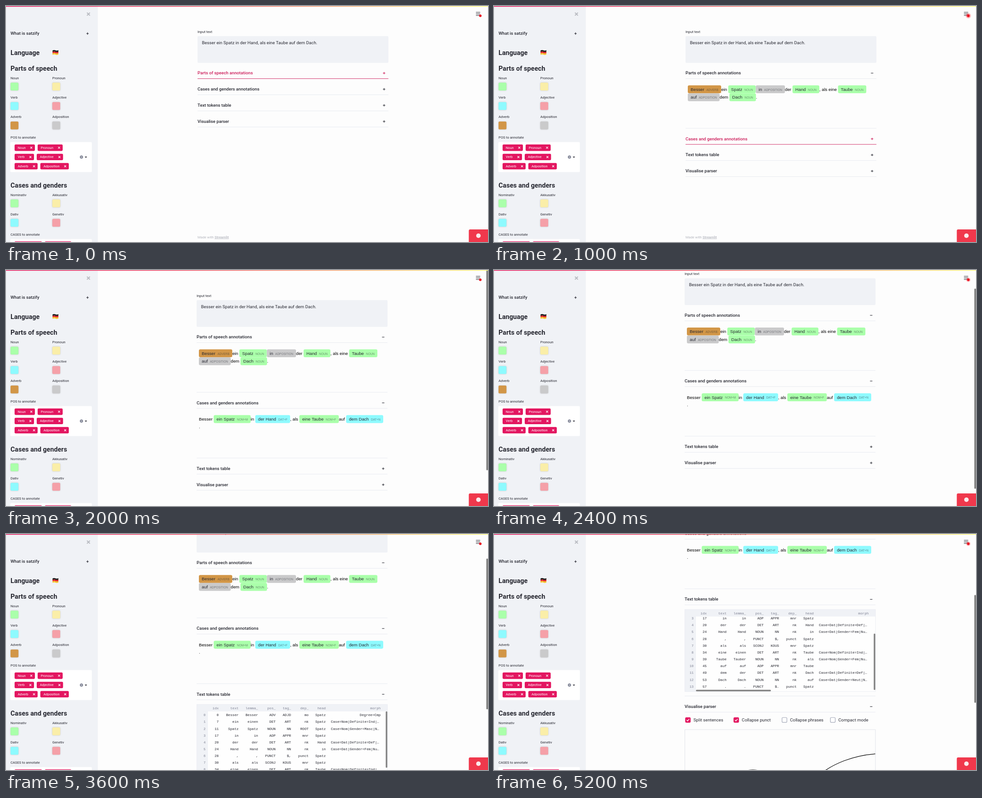
An HTML page with a canvas for the animation above (5400 ms loop, 1067 px wide and 525 px high).

```html
<!DOCTYPE html>
<html lang="en">
<head>
<meta charset="utf-8">
<title>satzify</title>
<style>
html, body { margin: 0; width: 100%; height: 100%; overflow: hidden; background: #fdfdfd; }
canvas { display: block; width: 1067px; height: 525px; }
</style>
</head>
<body>
<canvas id="stage"></canvas>
<script>
const W = 1067, H = 525, LOOP = 5400, STEP = 200;
const canvas = document.getElementById('stage');
const dpr = window.devicePixelRatio || 1;
canvas.width = Math.round(W * dpr);
canvas.height = Math.round(H * dpr);
const ctx = canvas.getContext('2d');

const SANS = 'Roboto, sans-serif';
const HELV = '"Liberation Sans", Arial, sans-serif';
const MONO = '"Liberation Mono", monospace';
const INK = '#262730', PINK = '#e31660', HOVER = '#cc1a58', PANEL = '#f0f2f6', RULE = '#e6e8f0', MUTED = '#808495';
const GREEN = '#aaffaa', YELLOW = '#faeea8', CYAN = '#8efafe', ROSE = '#f5a0a8', BROWN = '#d29647', GREY = '#cacacb';

const ramp = (t, a, b) => {
  const k = Math.min(1, Math.max(0, (t - a) / (b - a)));
  return k * k * (3 - 2 * k);
};

// Vertically centred text; returns its width.
function text(str, x, cy, size = 9.7, { weight = 400, color = INK, family = SANS, align = 'left' } = {}) {
  ctx.font = `${weight} ${size}px ${family}`;
  ctx.fillStyle = color;
  ctx.textAlign = align;
  ctx.fillText(str, x, cy + size * 0.35);
  return ctx.measureText(str).width;
}

function box(x, y, w, h, color, r = 0) {
  ctx.fillStyle = color;
  ctx.beginPath();
  ctx.roundRect(x, y, w, h, r);
  ctx.fill();
}

function disc(x, y, r, color) {
  ctx.fillStyle = color;
  ctx.beginPath();
  ctx.arc(x, y, r, 0, 7);
  ctx.fill();
}

function path(points, color, width = 1) {
  ctx.strokeStyle = color;
  ctx.lineWidth = width;
  ctx.beginPath();
  points.forEach(([x, y]) => ctx.lineTo(x, y));
  ctx.stroke();
}

function cross(x, y, r, color, width) {
  path([[x - r, y - r], [x + r, y + r]], color, width);
  path([[x - r, y + r], [x + r, y - r]], color, width);
}

function toggle(x, y, open, color = INK) {
  path([[x - 2.6, y], [x + 2.6, y]], color, 1.1);
  if (!open) path([[x, y - 2.6], [x, y + 2.6]], color, 1.1);
}

function clipped(x, y, w, h, draw) {
  ctx.save();
  ctx.beginPath();
  ctx.rect(x, y, w, h);
  ctx.clip();
  draw();
  ctx.restore();
}

function swatch(label, x, y, color) {
  text(label, x, y, 7.74);
  ctx.save();
  ctx.shadowColor = 'rgba(0,0,0,.22)';
  ctx.shadowBlur = 2.5 * dpr;
  box(x, y + 10.3, 17.5, 17.5, color, 2.5);
  ctx.restore();
}

function tag(label, x, y, w) {
  box(x, y, w, 14.4, PINK, 2.4);
  text(label, x + 7, y + 7.2, 7.4, { color: '#fff' });
  cross(x + w - 8, y + 7.2, 2.1, '#fff', 1.1);
}

function flag(x, y) {
  ['#1c1c1c', '#dd1b22', '#f7c52c'].forEach((color, i) => {
    ctx.fillStyle = color;
    ctx.beginPath();
    const edge = (px, row) => ctx.lineTo(x + px, y + row * 3.2 - Math.sin(px / 13 * 6.28) * 0.8 - px * 0.06);
    for (let px = 0; px <= 13; px++) edge(px, i);
    for (let px = 13; px >= 0; px--) edge(px, i + 1);
    ctx.fill();
  });
}

function sidebar() {
  box(0, 0, 203.3, H, PANEL);
  cross(182.5, 18, 3.3, '#b9bbc1', 2);
  text('What is satzify', 10, 61, 9.7, { weight: 500 });
  toggle(180.5, 61.3, false);
  const heading = (str, y) => text(str, 10, y, 14.6, { weight: 700 });
  heading('Language', 104);
  flag(103, 99);
  heading('Parts of speech', 139.3);
  swatch('Noun', 10, 160.2, GREEN);
  swatch('Pronoun', 102.5, 160.2, YELLOW);
  swatch('Verb', 10, 203.4, CYAN);
  swatch('Adjective', 102.5, 203.4, ROSE);
  swatch('Adverb', 10, 246.6, BROWN);
  swatch('Adposition', 102.5, 246.6, GREY);

  text('POS to annotate', 10, 292.7, 7.74);
  box(9.5, 302.8, 180.5, 66.7, '#fff', 2);
  tag('Noun', 19, 308, 45);
  tag('Pronoun', 70, 308, 55.5);
  tag('Verb', 19, 328.7, 43);
  tag('Adjective', 68, 328.7, 58.3);
  tag('Adverb', 19, 349.2, 51);
  tag('Adposition', 76, 349.2, 63);
  disc(167, 336, 3.5, MUTED);
  cross(167, 336, 1.1, '#fff', 0.8);
  ctx.fillStyle = INK;
  ctx.beginPath();
  ctx.moveTo(174.3, 335);
  ctx.lineTo(179.5, 335);
  ctx.lineTo(176.9, 337.7);
  ctx.fill();

  heading('Cases and genders', 399);
  swatch('Nominativ', 10, 420, GREEN);
  swatch('Akkusativ', 102.5, 420, YELLOW);
  swatch('Dativ', 10, 463.2, CYAN);
  swatch('Genetiv', 102.5, 463.2, ROSE);
  text('CASES to annotate', 10, 508.6, 7.74);
  box(9.5, 518.5, 180.5, 10, '#fff', 2);
  tag('Nominativ', 19, 523.7, 60.5);
  tag('Akkusativ', 86, 523.7, 58.5);
}

// A run is plain text, or [word, label, colour] for a highlighted chip.
function annotated(runs, x, cy) {
  for (const run of runs) {
    if (typeof run === 'string') {
      x += text(run, x, cy, 9.68, { family: HELV, color: '#000' });
      continue;
    }
    const [word, label, color] = run;
    ctx.font = `9.68px ${HELV}`;
    const wordWidth = ctx.measureText(word).width;
    ctx.font = `6.48px ${HELV}`;
    const width = wordWidth + ctx.measureText(label).width + 17.2;
    box(x, cy - 8.8, width, 17.6, color, 3.3);
    text(word, x + 6.3, cy, 9.68, { family: HELV });
    text(label, x + 11.1 + wordWidth, cy + 1, 6.48, { family: HELV, color: 'rgba(38,39,48,.5)' });
    x += width;
  }
}

const noun = word => [word, 'NOUN', GREEN];
const adposition = word => [word, 'ADPOSITION', GREY];

function speechBody(x, y) {
  annotated([['Besser', 'ADVERB', BROWN], 'ein ', noun('Spatz'), adposition('in'), 'der ', noun('Hand'),
    ', als eine ', noun('Taube')], x + 5, y + 36.3);
  annotated([adposition('auf'), 'dem ', noun('Dach'), '.'], x + 5, y + 54);
}

function casesBody(x, y) {
  annotated(['Besser ', ['ein Spatz', 'NOM+M', GREEN], 'in ', ['der Hand', 'DAT+F', CYAN], ', als ',
    ['eine Taube', 'NOM+F', GREEN], 'auf ', ['dem Dach', 'DAT+N', CYAN]], x + 5, y + 36.4);
  annotated(['.'], x + 5, y + 53);
}

const COLUMNS = [49, 93, 136, 175, 209, 248, 286, 407.5];
const HEADER = 'idx text lemma_ pos_ tag_ dep_ head morph'.split(' ');
const TOKENS = `0 Besser Besser ADV ADJD mo Spatz Degree=Cmp
7 ein einen DET ART nk Spatz Case=Nom|Definite=Ind|…
11 Spatz Spatz NOUN NN ROOT Spatz Case=Nom|Gender=Masc|N…
17 in in ADP APPR mnr Spatz
20 der der DET ART nk Hand Case=Dat|Definite=Def|…
24 Hand Hand NOUN NN nk in Case=Dat|Gender=Fem|Nu…
28 , , PUNCT $, punct Spatz
30 als als SCONJ KOUS mnr Spatz
34 eine einen DET ART nk Taube Case=Nom|Definite=Ind|…
39 Taube Tauber NOUN NN nk als Case=Nom|Gender=Fem|Nu…
45 auf auf ADP APPR mnr Taube
49 dem der DET ART nk Dach Case=Dat|Definite=Def|…
53 Dach Dach NOUN NN nk auf Case=Dat|Gender=Neut|N…
57 . . PUNCT $. punct Spatz`.split('\n').map(row => row.split(' '));

function tableBody(x, y, s) {
  const top = y + 22.8, height = 182.5;
  const cell = (str, right, cy, color = INK) => text(str, right, cy, 7.74, { family: MONO, align: 'right', color });
  box(x, top, 422.3, height, '#fefefe');
  box(x, top, 25, height, PANEL);
  clipped(x, top + 15.3, 423, height - 15.3, () => {
    TOKENS.forEach((row, i) => {
      const cy = top + 23.5 + i * 15.15 - s.tableScroll * 49.4;
      cell(i, x + 20, cy, MUTED);
      row.forEach((value, c) => cell(value, x + COLUMNS[c] - (value.length > 20 ? 3.5 : 0), cy));
    });
  });
  box(x, top, 422.3, 15.5, PANEL);
  HEADER.forEach((name, c) => cell(name, x + COLUMNS[c], top + 8.3, MUTED));
  ctx.strokeStyle = RULE;
  ctx.lineWidth = 0.7;
  ctx.strokeRect(x + 0.3, top, 422, height);
  box(x + 418.6, top + 15.5 + s.tableScroll * 38, 3.5, 125.5, '#858585', 1.7);
  box(x + 25, top + 178.5, 166, 3.5, '#858585', 1.7);
}

function checkbox(label, x, cy, checked) {
  ctx.beginPath();
  ctx.roundRect(x + 0.6, cy - 5.4, 10.8, 10.8, 2);
  ctx.lineWidth = 1.2;
  ctx.strokeStyle = checked ? PINK : '#a3a8b8';
  ctx.fillStyle = checked ? PINK : '#fff';
  ctx.fill();
  ctx.stroke();
  if (checked) path([[x + 3.2, cy], [x + 5.3, cy + 2.2], [x + 9, cy - 2.3]], '#fff', 1.4);
  text(label, x + 18.3, cy, 9.7);
}

function parserBody(x, y) {
  checkbox('Split sentences', x + 1.3, y + 30, true);
  checkbox('Collapse punct', x + 108.3, y + 30, true);
  checkbox('Collapse phrases', x + 215, y + 30, false);
  checkbox('Compact mode', x + 322, y + 30, false);
  ctx.strokeStyle = '#e2e4ea';
  ctx.lineWidth = 1;
  ctx.strokeRect(x + 0.5, y + 51.5, 421.8, 264);
  clipped(x, y + 51, 422, 264, () => {
    ctx.strokeStyle = '#000';
    ctx.lineWidth = 1.2;
    ctx.beginPath();
    ctx.moveTo(x + 295, y + 155);
    ctx.bezierCurveTo(x + 328, y + 126, x + 375, y + 109, x + 424, y + 105.3);
    ctx.moveTo(x + 95, y + 172);
    ctx.bezierCurveTo(x + 118, y + 131, x + 184, y + 131, x + 207, y + 172);
    ctx.stroke();
  });
}

const SECTIONS = [
  { title: 'Parts of speech annotations', body: speechBody, height: 110.4, hover: [0, 700], opens: 300 },
  { title: 'Cases and genders annotations', body: casesBody, height: 110.4, hover: [700, 1700], opens: 1100 },
  { title: 'Text tokens table', body: tableBody, height: 202.7, hover: [2500, 3300], opens: 3000 },
  { title: 'Visualise parser', body: parserBody, height: 327, hover: [4400, 5000], opens: 4600 },
];

function mainArea(t) {
  const opened = SECTIONS.map(s => ramp(t, s.opens, s.opens + 400));
  const pageHeight = 397.8 + SECTIONS.reduce((sum, s, i) => sum + s.height * opened[i], 0);
  const wanted = 65.5 * ramp(t, 2000, 2600) + 19.8 * ramp(t, 3300, 3600) + 211.1 * ramp(t, 3600, 4000);
  const scroll = Math.min(wanted, Math.max(0, pageHeight - H));
  const overflowing = pageHeight > H;
  const x = overflowing ? 422 : 424;
  const state = { tableScroll: ramp(t, 3800, 4200) };

  text('Input text', x, 57 - scroll, 7.74);
  box(x, 67 - scroll, 422.5, 59.5, PANEL, 2);
  text('Besser ein Spatz in der Hand, als eine Taube auf dem Dach.', x + 9.8, 81.6 - scroll, 9.73);

  let y = 149 - scroll;
  SECTIONS.forEach((section, i) => {
    const hovered = t >= section.hover[0] && t < section.hover[1];
    const color = hovered ? HOVER : INK;
    const bodyHeight = section.height * opened[i];
    text(section.title, x, y, 9.7, { weight: 500, color });
    toggle(x + 413, y + 0.3, opened[i] > 0, color);
    path([[x, y + 12.6], [x + 422.5, y + 12.6]], hovered ? HOVER : RULE, 0.9);
    if (bodyHeight > 0) {
      clipped(x - 1, y + 12.6, 426, bodyHeight, () => section.body(x, y, state));
      path([[x, y + 12.6 + bodyHeight], [x + 422.5, y + 12.6 + bodyHeight]], RULE, 0.9);
    }
    y += 35.85 + bodyHeight;
  });

  const footer = Math.max(H, pageHeight) - 11 - scroll;
  const faint = '#b4b6be';
  const lead = text('Made with ', x, footer, 7.74, { color: faint });
  const link = text('Streamlit', x + lead, footer, 7.74, { color: faint, weight: 500 });
  path([[x + lead, footer + 4], [x + lead + link, footer + 4]], faint, 0.7);

  if (overflowing) box(1063.2, scroll * H / pageHeight, 3.8, H * H / pageHeight, '#858585', 1.9);
}

function overlay(t) {
  const bar = ctx.createLinearGradient(0, 0, W, 0);
  bar.addColorStop(0, '#e6195f');
  bar.addColorStop(0.35, '#ee4a66');
  bar.addColorStop(1, '#fffd80');
  box(0, 0, W, 1.4, bar);

  for (const y of [14, 17.5, 21]) path([[1040.3, y], [1049.7, y]], '#4c4d55', 1.3);
  const glow = 0.5 + 0.5 * Math.cos((t - 800) / 1000 * Math.PI);
  const radius = 3 + 4 * glow;
  const halo = ctx.createRadialGradient(1050, 21.7, 1.5, 1050, 21.7, radius);
  halo.addColorStop(0, `rgba(255,20,30,${0.3 + 0.5 * glow})`);
  halo.addColorStop(1, 'rgba(255,20,30,0)');
  disc(1050, 21.7, radius, halo);
  disc(1050, 21.7, 2.7, '#e8081c');

  box(1024.5, 497, 42.5, 28, '#f0384c', [3, 0, 0, 0]);
  disc(1045.8, 511, 5, '#fbe9eb');
}

function render(t) {
  ctx.setTransform(dpr, 0, 0, dpr, 0, 0);
  box(0, 0, W, H, '#fdfdfd');
  mainArea(t);
  sidebar();
  overlay(t);
}

function tick() {
  const t = performance.now() % LOOP;
  render(Math.floor(t / STEP) * STEP);
  requestAnimationFrame(tick);
}
tick();
</script>
</body>
</html>
```
